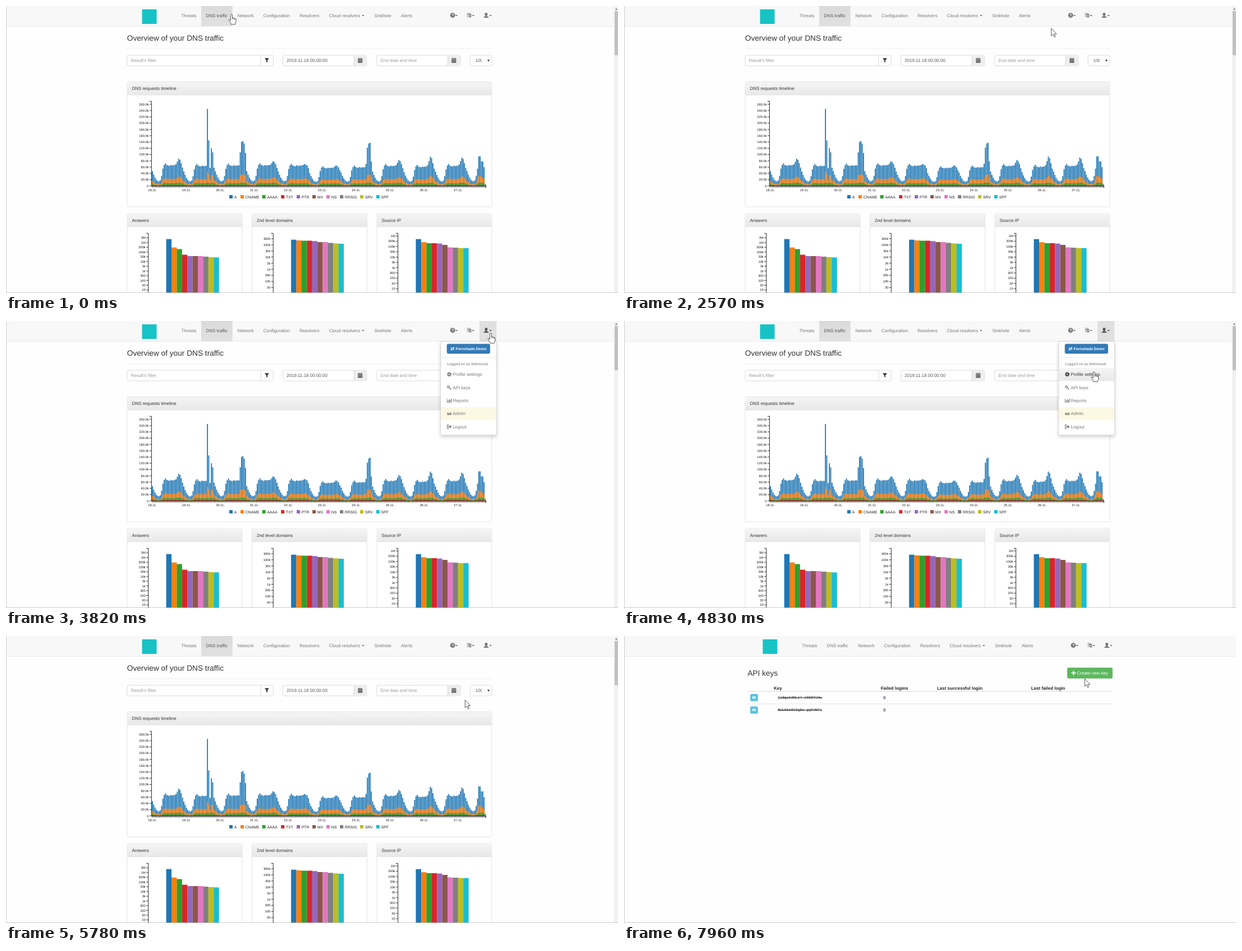
Animation, 1091 px wide and 513 px high, one loop 8 s. Source, as an HTML page:

```html
<!DOCTYPE html>
<html lang="en">
<head>
<meta charset="utf-8">
<title>DNS traffic overview</title>
<style>
html, body { margin: 0; width: 100%; height: 100%; overflow: hidden; background: #fefefe; }
svg { display: block; width: 100vw; height: 100vh; }
text { font-family: "Liberation Sans", Arial, sans-serif; font-size: 7.98px; fill: currentColor; text-rendering: geometricPrecision; white-space: pre; }
.mono { font-family: "Liberation Mono", monospace; }
#menu { filter: drop-shadow(0 3px 3px rgba(0, 0, 0, .18)); }
</style>
</head>
<body>
<svg id="stage" viewBox="0 0 1091 513" xmlns="http://www.w3.org/2000/svg"></svg>
<script>
const LOOP = 8000;
const COLORS = ['#1f77b4', '#ff7f0e', '#2ca02c', '#d62728', '#9467bd', '#8c564b', '#e377c2', '#7f7f7f', '#bcbd22', '#17becf'];

const rect = (x, y, w, h, fill, extra = '') => `<rect x="${x}" y="${y}" width="${w}" height="${h}" fill="${fill}" ${extra}/>`;
const text = (x, y, s, color = '#777', size = 7.98, extra = '') =>
  `<text x="${x}" y="${y}" style="font-size:${size}px;color:${color}" ${extra}>${s}</text>`;
const path = (d, extra = 'fill="currentColor"') => `<path d="${d}" ${extra}/>`;
const line = (d, color, w = 0.8, extra = '') => path(d, `fill="none" stroke="${color}" stroke-width="${w}" ${extra}`);
const ring = (x, y, r, w, extra = '') => `<circle cx="${x}" cy="${y}" r="${r}" fill="none" stroke="currentColor" stroke-width="${w}" ${extra}/>`;
const group = (x, y, body) => `<g transform="translate(${x} ${y})">${body}</g>`;
const box = (x, y, w, h, fill, stroke, r = 2.2) => rect(x, y, w, h, fill, `stroke="${stroke}" stroke-width=".7" rx="${r}"`);
const caret = x => path(`M${x} 16h4.8l-2.4 2.5z`);

/* ---------- navigation ---------- */
const NAV = [
  ['Threats', 312.4, 348], ['DNS traffic', 356.6, 403.7], ['Network', 412.4, 450], ['Configuration', 458.8, 514.5],
  ['Resolvers', 523.2, 567], ['Cloud resolvers', 575.8, 648], ['Sinkhole', 656.4, 695.5], ['Alerts', 704, 733]
];
const ICONS = [
  [783.5, 814, '<circle cx="796.2" cy="16.6" r="4.4" fill="currentColor"/>' +
    text(794.2, 19.3, '?', '#fff', 7, 'font-weight="bold"') + caret(800.6)],
  [814, 844, rect(822.4, 13, 4.4, 6, 'none', 'stroke="currentColor" stroke-width=".7"') +
    rect(825.4, 14.2, 4, 6, 'currentColor') + line('M823.4 15h2.4M824.6 14v3.4', 'currentColor', .7) +
    line('M826.3 19l1.1-3.2 1.1 3.2', '#f8f8f8', .6) + caret(830.4)],
  [844, 874.4, path('M856 12c3.4 0 2.9 4.3 1.3 5.3v.9l3 1.3v1.5h-8.6v-1.5l3-1.3v-.9c-1.6-1-2.1-5.3 1.3-5.3z') + caret(861.4)]
];

function nav() {
  let s = rect(0, 0, 1091, 36, '#f8f8f8') + rect(0, 35.8, 1091, .8, '#e3e3e3');
  s += '<g id="nav">' + rect(348, 0, 55.7, 36, 'url(#active)', 'id="tab"') + rect(844, 0, 30.4, 36, '#e0e0e0', 'id="userBg"');
  s += rect(242.5, 6, 26, 26, '#17c3c5');
  NAV.forEach(([label, x], i) => {
    s += `<g class="link">${text(x, 20, label, 'inherit')}${i === 5 ? caret(634.2) : ''}</g>`;
  });
  ICONS.forEach(icon => { s += `<g class="link">${icon[2]}</g>`; });
  return s + '</g>';
}

/* ---------- traffic page ---------- */
const DAY = [47, 36, 27, 20, 16, 15, 18, 32, 55, 67, 72, 67, 65, 64, 67, 65, 66, 66, 66, 66, 67, 66, 65, 57];
const LEVEL = [1, .97, .99, 1, .98, .87, .9, .97, .93, .97, 1];
const BUMP = [20, 0, 0, 12, 4, 7, 0, 18, 32, 26, 0];
const SPIKES = {
  42: 245, 43: 145, 44: 57, 45: 120, 46: 107, 47: 58, 67: 107, 68: 140, 69: 143, 70: 135, 71: 105,
  163: 70, 164: 122, 165: 135, 166: 138, 167: 78, 249: 94, 250: 94, 251: 78, 252: 78, 253: 60, 254: 6
};
const PITCH = 2.337, BASE = 321.6, PER_K = .5612;

function load(i) {
  const d = Math.floor(i / 24), h = i % 24;
  return SPIKES[i] || DAY[h] * LEVEL[d] + BUMP[d] * Math.exp(-(((h - 20.3) / 1.7) ** 2));
}

function timeline() {
  const layers = [['#1f77b4', v => v], ['#ff7f0e', v => Math.min(v * .34, 25 + v * .08)],
    ['#2ca02c', v => Math.min(v * .13, 10)], ['#d62728', v => Math.min(v * .05, 3)], ['#9467bd', v => Math.min(v * .02, 1.2)]];
  let s = '';
  for (const [color, size] of layers) {
    let d = '';
    for (let i = 0; i < 255; i++) {
      const h = size(load(i)) * PER_K;
      d += `M${(260.1 + i * PITCH).toFixed(2)} ${BASE}v${(-h).toFixed(2)}h1.8v${h.toFixed(2)}z`;
    }
    s += path(d, `fill="${color}"`);
  }
  s += line('M255.8 170.3H259.4V321.8H855.6V324.8', '#111', .9);
  s += line('M260.2 323.2H855', '#222', 2.6, `stroke-dasharray=".85 ${PITCH - .85}"`);
  for (let k = 0; k <= 260; k += 20) {
    const y = BASE - k * PER_K;
    s += line(`M255.8 ${y}h3.6`, '#111', .8) + text(254.4, y + 2, k ? k + '.0k' : '0', '#111', 5.7, 'text-anchor="end"');
  }
  for (let d = 0; d < 10; d++) s += text(261 + d * 60.55, 331, `${18 + d}.11.`, '#111', 5.7, 'text-anchor="middle"');
  const names = ['A', 'CNAME', 'AAAA', 'TXT', 'PTR', 'MX', 'NS', 'RRSIG', 'SRV', 'SPF'];
  const xs = [398, 418, 456.7, 490.3, 518.2, 546.2, 571.2, 595.3, 631.2, 660];
  names.forEach((n, i) => { s += rect(xs[i], 338, 6, 6, COLORS[i]) + text(xs[i] + 8.8, 343.6, n, '#222', 6.84); });
  return s;
}

function panel(x, y, w, h, title) {
  return box(x, y, w, h, '#fff', '#d8d8d8') + rect(x + .4, y + .4, w - .8, 23, 'url(#head)') +
    line(`M${x} ${y + 23.6}h${w}`, '#ddd', .7) + text(x + 8.4, y + 14.5, title, '#333');
}

function ranking(x, title, labels, y0, step, tops) {
  let s = panel(x, 371, 205, 160, title);
  const ax = x + 37.7;
  s += line(`M${ax - 3.6} 406.3H${ax}V513`, '#111', .9);
  labels.forEach((l, i) => {
    const y = y0 + i * step;
    s += line(`M${ax - 3.6} ${y}h3.6`, '#111', .8) + text(ax - 5, y + 2, l, '#111', 5.7, 'text-anchor="end"');
  });
  tops.forEach((y, i) => { s += rect(x + 69.6 + i * 9.4, y, 9.45, 520 - y, COLORS[i]); });
  return s;
}

const calendar = x => path(`M${x} 93.8h1.5v-1h1.2v1h2.6v-1h1.2v1h1.5v7.6h-8z`, 'fill="#555"') +
  line(`M${x + .8} 97h6.4M${x + .8} 99h6.4`, '#ddd', .8, 'stroke-dasharray="1.2 .5"') + line(`M${x} 95.4h8`, '#eee', .5);

const dateField = (x, split, w, label, color) => box(x, 88, w, 19, '#fff', '#ccc') +
  rect(split, 88.4, x + w - split - .4, 18.2, '#eee') + line(`M${split} 88V107`, '#ccc', .7) +
  text(x + 6.7, 100.4, label, color) + calendar(split + 6.8);

function trafficPage() {
  let s = text(215.8, 62.2, 'Overview of your DNS traffic', '#333', 13.68) + line('M216 76.3H866', '#eee', .8);
  s += box(216, 88, 260.3, 19, '#fff', '#ccc') + line('M454 88V107', '#ccc', .7) + text(222.4, 100.4, "Result's filter", '#999');
  s += path('M461 93.3h8l-3 3.6v4.2l-2-1.5v-2.7z', 'fill="#333"');
  s += dateField(493.6, 620.6, 149.2, '2019.11.18 00:00:00', '#555') + dateField(661, 787.6, 149, 'End date and time', '#999');
  s += box(827.3, 88, 38.7, 19, '#fff', '#ccc') + `<g clip-path="url(#cut)">${text(836.8, 100.4, '100', '#555')}</g>` +
    path('M858 96h4.2l-2.1 3.6z', 'fill="#333"');
  s += panel(216, 135.5, 650, 223.5, 'DNS requests timeline') + timeline();
  const low = ['300k', '100k', '30k', '10k', '3k', '1k', '300', '100', '30'];
  s += ranking(216, 'Answers', ['3M', '1M', ...low, '10'], 414.3, 8.47, [416.6, 431.6, 434.5, 444.6, 447, 447, 447, 448, 448.8, 449.4]);
  s += ranking(438.6, '2nd level domains', low, 415.9, 10.92, [417.7, 419, 419.5, 419.5, 420.2, 422, 422, 423.4, 424.3, 425]);
  s += ranking(661, 'Source IP', ['1M', ...low, '10'], 411, 9.43, [416.7, 422.2, 424, 424, 424.6, 427, 431.4, 432, 432.6, 432.7]);
  s += rect(1084, 0, 7, 513, '#f1f1f1') + rect(1085, 9, 6, 79, '#c1c1c1') + path('M1086 6.5h4l-2-2.5z', 'fill="#666"');
  return s;
}

/* ---------- user menu ---------- */
const ITEMS = [
  ['Profile settings', ring(0, 0, 2.1, 1.7) + ring(0, 0, 3.4, 1.5, 'stroke-dasharray="1.35 1.32"')],
  ['API keys', ring(-1.7, -1, 1.8, 1.2) + line('M-.4 0L3.4 3.2M1.4 1.6l-1 1.2M2.7 2.7l-1 1.2', 'currentColor', 1.1)],
  ['Reports', line('M-4-3.5V3.2H4.5', 'currentColor', .8) + line('M-2.2 2.5V0M-.2 2.5V-2M1.8 2.5V-1M3.7 2.5V-3.3', 'currentColor', 1.2)],
  ['Admin', ring(-2, .7, 1.5, 1.2) + ring(2, .7, 1.5, 1.2) + line('M-3.6 0l1-1.8M3.6 0l-1-1.8M-.6 0h1.2', 'currentColor', .8)],
  ['Logout', line('M-.5-3H-3.5V3H-.5', 'currentColor', 1.1) + path('M-1.6-1H1V-3L4.3 0 1 3V1h-2.6z')]
];

function menu() {
  let s = `<g id="menu">${box(775, 36.4, 99.3, 167.6, '#fff', '#c8c8c8', 1.5)}</g>`;
  s += box(786.2, 41.2, 76.4, 16.8, '#337ab7', '#2b669a') + text(801.8, 52, 'Fernshade Demo', '#fff', 6.75, 'font-weight="bold"');
  s += group(796, 49.6, line('M-3.5-1.3H2M-2 1.4H3.5', '#fff', 1.1) + path('M1-3.3l2.8 2-2.8 2zM-1-.6l-2.8 2 2.8 2z', 'fill="#fff"'));
  s += line('M775.4 65.6h98.5', '#e5e5e5', .8) + text(786.2, 79.2, 'Logged on as belmorast', '#777', 6.84);
  ITEMS.forEach(([label, icon], i) => {
    const y = 84 + i * 23.4;
    s += `<g class="item">${rect(775.4, y, 98.5, 23.3, '#fff')}${group(790.2, y + 11.3, icon)}${text(796.4, y + 14.2, label, 'inherit')}</g>`;
  });
  return s;
}

/* ---------- keys page ---------- */
function keysPage() {
  let s = text(220.2, 70.7, 'API keys', '#333', 13.68) + box(790.4, 56.9, 80.2, 18.7, '#5cb85c', '#55b155');
  s += line('M797.6 66.1h7.6M801.4 62.3v7.6', '#fff', 2) + text(807.6, 69, 'Create new key', '#fff');
  const arrow = line('M-8.3-2A8.5 8.5 0 0 1 6.3-5.7', '#8c8c8c', 3.2) + path('M10.3-9.8V-2H2.5z', 'fill="#8c8c8c"');
  s += `<g id="spin">${arrow}<g transform="rotate(180)">${arrow}</g></g><g id="table">`;
  [['Key', 267], ['Failed logins', 457.7], ['Last successful login', 558], ['Last failed login', 725.7]]
    .forEach(([h, x]) => { s += text(x, 95.8, h, '#222', 7.98, 'font-weight="bold"'); });
  s += line('M220.3 99H870.8', '#d8d8d8', 1) + line('M220.3 121.4H870.8', '#ddd', .7);
  ['ji8gwtdHLz7-z098TcHw', '8UL56e0V2gDw-gqFU9Fi'].forEach((key, i) => {
    const y = 110 + i * 22.2;
    s += box(225.4, y - 6, 12.9, 12.1, '#5bc0de', '#52bbdb', 1.7);
    s += path(`M228 ${y}q3.8-4.8 7.6 0q-3.8 4.8-7.6 0z`, 'fill="#fff"') + `<circle cx="231.8" cy="${y}" r="1.2" fill="#5bc0de"/>`;
    s += text(274, y + 2.2, key, '#111', 6.58, 'class="mono"') + line(`M274 ${y + .2}h79`, '#111', .8) +
      text(462, y + 2.7, '0', '#4d4f78', 7.98, 'font-weight="bold"');
  });
  return s + '</g>';
}

/* ---------- assembly ---------- */
const gradient = (id, a, b) => `<linearGradient id="${id}" x2="0" y2="1"><stop stop-color="${a}"/><stop offset="1" stop-color="${b}"/></linearGradient>`;
const outline = 'fill="#fff" stroke="#222" stroke-width=".75" stroke-linejoin="round"';

document.getElementById('stage').innerHTML =
  `<defs>${gradient('head', '#f5f5f5', '#e8e8e8')}${gradient('active', '#dadada', '#e1e1e1')}
  <clipPath id="cut"><rect x="830" y="88" width="18.3" height="19"/></clipPath></defs>` +
  rect(0, 0, 1091, 513, '#fefefe') + nav() + `<g id="traffic">${trafficPage()}</g><g id="drop">${menu()}</g><g id="keys">${keysPage()}</g>` +
  line('M.5 0V512.5H1091', '#c6c6c6', .9) +
  '<circle id="click" r="9.5" fill="#888" fill-opacity=".2" stroke="#888" stroke-opacity=".5"/>' +
  `<g id="arrow">${path('M.4.4V14L3.5 11.2 5.7 16 7.7 15.1 5.6 10.4H9.8Z', outline)}</g>` +
  `<g id="hand">${path('M-1.5 1.3Q-1.5 0 0 0T1.5 1.3V6.2Q4 5.4 4.2 7Q6.4 6.4 6.6 8Q8.2 7.6 8.2 9.4V12Q8.2 14 6.8 15.6V17.8H-.8V16.2L-4.6 10.8Q-5.2 9.2-3.7 9L-1.5 11Z', outline)}${line('M1.5 6V9M4.2 7V9.3M6.6 8V9.8', '#222', .7)}</g>`;

const $ = id => document.getElementById(id);
const show = (id, on) => { $(id).style.display = on ? '' : 'none'; };
const links = [...document.querySelectorAll('.link')];
const items = [...document.querySelectorAll('.item')];
const zones = [...NAV.map((n, i) => [i ? NAV[i - 1][2] : 304, n[2]]), ...ICONS];

// start, end, steps, end x, end y, ease-out powers for x and y
const MOVES = [
  [1160, 1940, 11, 618, 59.5, 1.26, 1.8],
  [2260, 3040, 11, 858, 26, 1.5, 1.5],
  [3120, 3350, 4, 864, 22, 1.3, 1.3],
  [4600, 5300, 10, 818, 114, 1.65, 2.7],
  [7490, 7960, 7, 821, 76, 1.5, 1.5]
];

function cursorAt(t) {
  let x = 402, y = 15;
  for (const [a, b, n, tx, ty, ex, ey] of MOVES) {
    if (t < a) break;
    const k = Math.min(n, 1 + Math.floor((t - a) / ((b - a) / (n - 1)) + .1));
    const left = 1 - k / n;
    x += (tx - x) * (1 - left ** ex);
    y += (ty - y) * (1 - left ** ey);
  }
  return [x, y];
}

function draw(t) {
  const [x, y] = cursorAt(t);
  const open = t >= 3750 && t < 5780, onKeys = t >= 6400;
  const overLink = y < 36 ? zones.findIndex(z => x >= z[0] && x < z[1]) : -1;
  const overItem = open && y >= 84 ? Math.floor((y - 84) / 23.4) : -1;
  const overButton = open && y > 41 && y < 58 && x > 786 && x < 863;
  const hand = overLink >= 0 || overItem >= 0 || overButton;

  show('traffic', !onKeys);
  show('keys', onKeys);
  show('tab', !onKeys);
  show('userBg', open);
  show('drop', open);
  show('spin', t < 6570);
  show('table', t >= 6570);
  $('nav').setAttribute('transform', `translate(${onKeys ? 4.8 : 0} 0)`);
  $('spin').setAttribute('transform', `translate(545.2 87.3) rotate(${t < 6490 ? 0 : 16})`);

  links.forEach((el, i) => {
    const active = (i === 1 && !onKeys) || (i === 10 && open);
    el.style.color = active ? '#555' : i === overLink ? '#333' : '#777';
  });
  items.forEach((el, i) => {
    el.style.color = i === overItem ? '#333' : '#777';
    el.firstChild.setAttribute('fill', i === overItem ? 'url(#head)' : i === 3 ? '#fcf8e3' : '#fff');
  });

  const at = `translate(${x.toFixed(2)} ${y.toFixed(2)})`;
  for (const id of ['hand', 'arrow', 'click']) $(id).setAttribute('transform', at);
  show('hand', hand);
  show('arrow', !hand);
  show('click', (t >= 3580 && t < 3750) || (t >= 5530 && t < 5780));
}

function tick() {
  draw(performance.now() % LOOP);
  requestAnimationFrame(tick);
}
tick();
</script>
</body>
</html>
```
